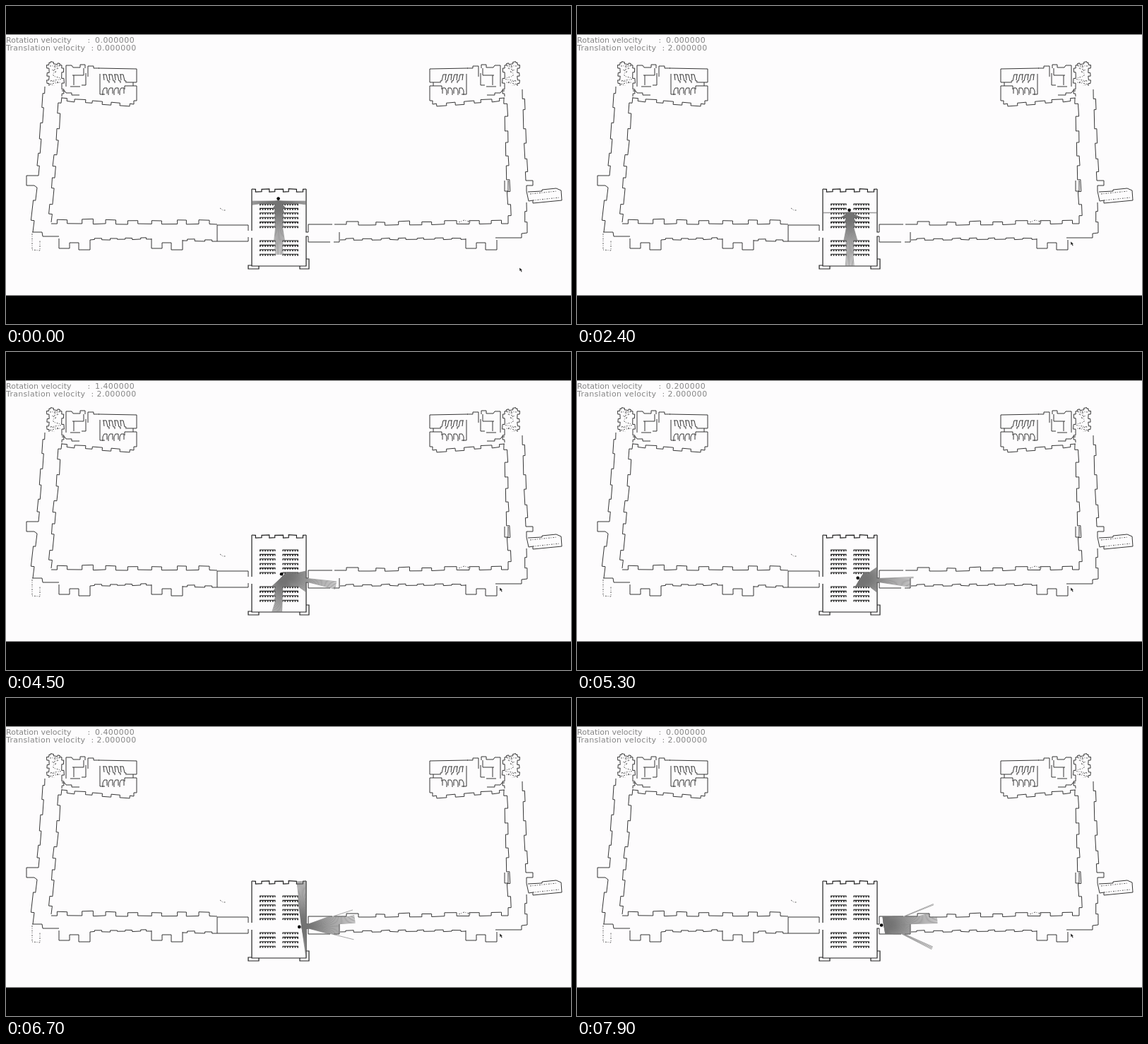
Write an HTML page that moves like this. It is 800 px wide and 450 px high and loops after 8 s.

```html
<!DOCTYPE html>
<html lang="en">
<head>
<meta charset="utf-8">
<title>Floor plan laser scan</title>
<style>
html, body { margin: 0; width: 100%; height: 100%; overflow: hidden; background: #000; }
svg { display: block; width: 100vw; height: 100vh; }
text { font: 11px "DejaVu Sans", sans-serif; fill: #858585; }
.value { letter-spacing: .45px; }
#map path { fill: none; stroke: #2c2c2c; stroke-width: .95; }
#map .dots { stroke: #555; stroke-dasharray: 2 1.5 1 2; }
#map .hall { stroke: #222; stroke-width: 1.2; }
#map .desk { stroke: #222; stroke-width: 1.1; }
#map .chair { stroke: #222; stroke-width: 1.9; stroke-dasharray: 1.8 1.8; }
#rays { fill: none; stroke: #747474; stroke-width: .64; }
</style>
</head>
<body>
<svg viewBox="0 0 800 450">
  <rect y="40.3" width="800" height="369.3" fill="#fdfcfd"/>
  <g id="map">
    <g id="wing"></g>
    <use href="#wing" transform="translate(785) scale(-1 1)"/>
  </g>
  <path id="rays"/>
  <circle id="robot" r="2.3"/>
  <path id="cursor" d="M0 0l.4 4.6 1.1-1 1.2 2.3.9-.5-1.1-2.2 1.4-.3z" fill="#222"/>
  <text y="52">Rotation velocity</text>
  <text x="115.5" y="52">:</text>
  <text id="rot" class="value" x="126" y="52"></text>
  <text y="63" style="letter-spacing:.3px">Translation velocity</text>
  <text x="120.5" y="63">:</text>
  <text id="trans" class="value" x="128.5" y="63"></text>
</svg>
<script>
const $ = id => document.getElementById(id);
const rad = Math.PI / 180;

let seed = 7;
function rnd(a, b) {
  seed = (seed * 16807) % 2147483647;
  return a + (b - a) * seed / 2147483647;
}

function addPath(d, cls = "", parent = "map") {
  const p = document.createElementNS("http://www.w3.org/2000/svg", "path");
  p.setAttribute("d", d);
  p.setAttribute("class", cls);
  $(parent).append(p);
}

// Wall with n niches; positive depth lies to the left of the direction of travel
function wall(x0, y0, x1, y1, n, depth, cls, parent) {
  const dx = x1 - x0, dy = y1 - y0, len = Math.hypot(dx, dy);
  let d = `M${x0} ${y0}`;
  const to = (k, off) => {
    d += `L${(x0 + dx * k + dy / len * off).toFixed(1)} ${(y0 + dy * k - dx / len * off).toFixed(1)}`;
  };
  for (let i = 0; i < n; i++) {
    const a = (i + rnd(.22, .32)) / n, b = (i + rnd(.64, .78)) / n;
    const h = depth * rnd(.75, 1.1);
    to(a, rnd(-.5, .5));
    to(a, h);
    to(b, h + rnd(-.6, .6));
    to(b, rnd(-.5, .5));
  }
  to(1, 0);
  addPath(d, cls, parent);
}

// Polyline that is drawn and also stops the laser
const segs = [];
function solid(cls, ...p) {
  for (let i = 0; i + 3 < p.length; i += 2) segs.push(p.slice(i, i + 4));
  addPath("M" + p.join(" "), cls);
}

// Upper wing, used twice
addPath("M131 88l54 1v19h-5v5h5v21h-4v5M180 108h-9M180 113h-12v5M133 96v29h7", "", "wing");
addPath("M85 114V84h8l2 3h10v-4h7v5M91 114h14M96 98v14M94 98h16v-10M116 100V85h8v3h8M113 95v17h-6", "", "wing");
addPath("M79 120h4l2 3h8v3h11", "", "wing");
wall(181, 139, 79, 130, 4, 4, "", "wing");
for (let x = 137; x < 165; x += 8) {
  addPath(`M${x} 97h5l2 9h2v3M${x + 1} 97l1 8M${x} 126v-6l2-4h4v8`, "", "wing");
}
wall(61, 113, 61, 80, 3, 3, "", "wing");
wall(61, 80, 79, 84, 2, 2, "", "wing");
wall(79, 84, 79, 128, 3, 3, "", "wing");
let noise = "M62 85";
for (let i = 0; i < 14; i++) noise += `L${rnd(60, 80)} ${84 + i * 2.2}`;
addPath(noise, "dots", "wing");

// Side corridors
wall(79, 129, 64, 306, 5, -4);
wall(55, 114, 46, 240, 3, -3);
addPath("M46 240h-17v14h11l4 3");
wall(44, 257, 38, 320, 1, -4);
addPath("M37 320h14l1 6h23");
wall(705, 130, 711, 308, 5, 4);
wall(731, 118, 736, 247, 3, 3);
addPath("M736 247h10v7h-9v8l3 14 6-1v4l41-4-1-14-7-3-20 2v2l-20 1");
addPath("M742 266l38-4M746 275l38-4M37 322v23l11 1v-14M303 286l4 3 5 0M641 306l8-3 10 3", "dots");
wall(737, 278, 738, 321, 1, -3);
addPath("M738 321l-8 1v6h-37M706 247v15h5v-15");

// Long corridors
wall(64, 308, 299, 309, 7, 6);
wall(515, 310, 711, 308, 6, 5);
for (const x of [75, 206, 651]) addPath(`M${x} 329v14h15v-8h13v10h16v-14`);
wall(119, 331, 206, 330, 4, 2);
wall(250, 332, 299, 333, 2, 2);
wall(473, 331, 651, 330, 7, 2);
addPath("M343 318v-8h-44v23h44v-6");

// Hall, its right-hand door and the room behind it
wall(348, 259, 425, 259, 4, -4, "hall");
segs.push([348, 259, 425, 259]);
solid("hall", 348, 259, 348, 318);
solid("hall", 348, 328, 348, 368, 425, 368, 425, 326, 428, 326);
solid("hall", 425, 259, 425, 320, 428, 320);
addPath("M348 367h-5v5h15v-4M416 368v4h13v-14h-4", "hall");
solid("", 428, 320, 428, 309, 462, 309);
solid("", 465, 309, 482, 309, 482, 305, 499, 305, 499, 310, 515, 310);
solid("", 428, 326, 428, 334, 459, 334);
solid("", 464, 334, 472, 334, 472, 320);

function deskRows(y, n) {
  for (let i = 0; i < n; i++, y += 6.4) {
    for (const [outer, inner] of [[359, 381], [414, 392]]) {
      solid("desk", outer, y, inner, y, inner, y + 2);
      addPath(`M${outer} ${y + 1.3}H${inner}`, "chair");
    }
  }
}
deskRows(280, 6);
deskRows(332, 4);

// Velocities ramp between [step, value] keys, rounded to 0.2
function ramp(keys, s) {
  let i = 1;
  while (i < keys.length - 1 && keys[i][0] < s) i++;
  const [a, va] = keys[i - 1], [b, vb] = keys[i];
  const k = Math.min(1, Math.max(0, (s - a) / (b - a)));
  return Math.round((va + (vb - va) * k) * 5) / 5;
}
const speed = s => ramp([[0, 0], [9, 1.4], [13, 2]], s);
const turn = s => ramp([[27, 0], [35, 1.4], [38, 1.4], [43, .2], [48, .2],
                        [53, 1.2], [55, 1.2], [61, 0]], s);

// The pose follows from the two velocities
const LAST = 71, poses = [{ x: 385.6, y: 272.6, dir: 90 }];
for (let s = 1; s <= LAST; s++) {
  const p = poses[s - 1], dir = p.dir - 4.05 * turn(s), v = .667 * speed(s);
  poses.push({ x: p.x + v * Math.cos(dir * rad), y: p.y + v * Math.sin(dir * rad), dir });
}

const RANGE = 76;
function cast(x, y, angle) {
  const dx = Math.cos(angle), dy = Math.sin(angle);
  let best = RANGE;
  for (const [x1, y1, x2, y2] of segs) {
    const ex = x2 - x1, ey = y2 - y1, det = dx * ey - dy * ex;
    if (Math.abs(det) < 1e-9) continue;
    const r = ((x1 - x) * ey - (y1 - y) * ex) / det;
    const k = ((x1 - x) * dy - (y1 - y) * dx) / det;
    if (r > 0 && r < best && k >= 0 && k <= 1) best = r;
  }
  return [x + dx * best, y + dy * best];
}

function scan({ x, y, dir }) {
  const lx = x + 3.5 * Math.cos(dir * rad), ly = y + 3.5 * Math.sin(dir * rad);
  let d = "";
  for (let a = -90; a <= 90; a++) {
    d += `M${lx.toFixed(2)} ${ly.toFixed(2)}L`
      + cast(lx, ly, (dir + a) * rad).map(v => v.toFixed(2)).join(" ");
  }
  return d;
}

// One step per 100 ms, with two short holds
function stepAt(t) {
  if (t < 700) return 0;
  const s = Math.floor((t - 700) / 100) + 1 - (t >= 3000) - (t >= 4600);
  return Math.min(LAST, s);
}

let shown = -1;
function draw(t) {
  const k = Math.min(2, Math.floor(t / 100)) / 2;
  $("cursor").setAttribute("transform", `translate(${727 - 28 * k} ${370.5 - 37 * k})`);
  const s = stepAt(t);
  if (s === shown) return;
  shown = s;
  $("robot").setAttribute("cx", poses[s].x);
  $("robot").setAttribute("cy", poses[s].y);
  $("rays").setAttribute("d", scan(poses[s]));
  $("rot").textContent = turn(s).toFixed(6);
  $("trans").textContent = speed(s).toFixed(6);
}

const start = performance.now();
function tick() {
  draw((performance.now() - start) % 8000);
  requestAnimationFrame(tick);
}
tick();
</script>
</body>
</html>
```
